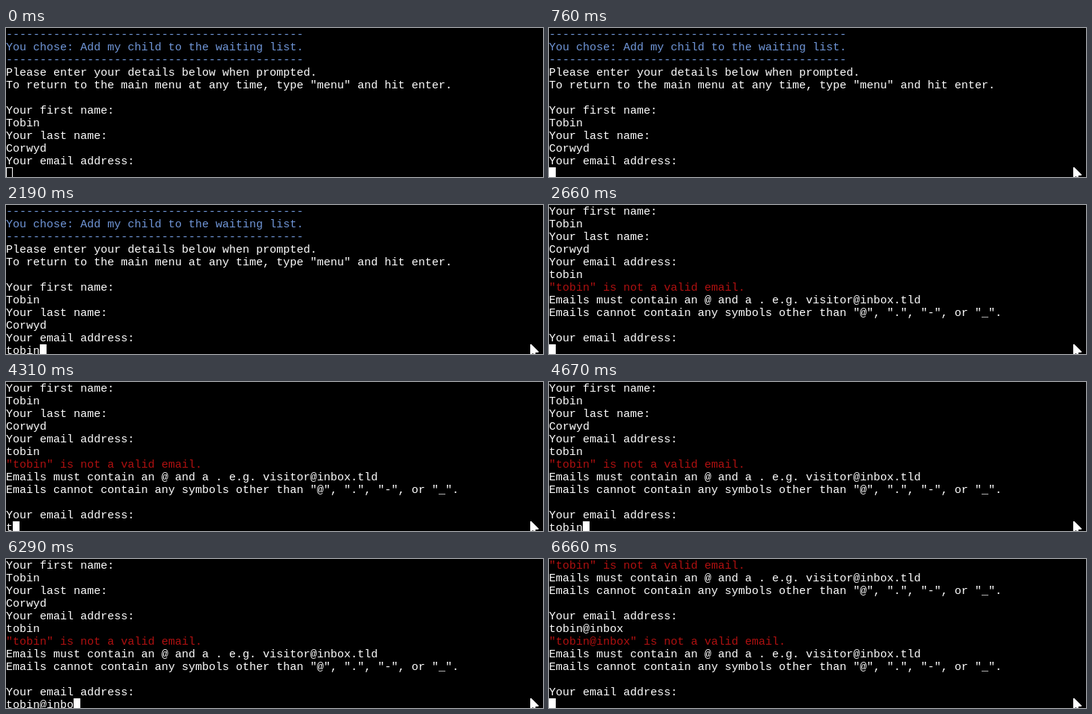
These frames come from a looping animation (715 by 200 pixels, 8000 ms). An HTML page:

```html
<!DOCTYPE html>
<html lang="en">
<head>
<meta charset="utf-8">
<title>Waiting list terminal</title>
<style>
  html, body { margin: 0; width: 100%; height: 100%; overflow: hidden; background: #000; }
  #stage { position: relative; width: 715px; height: 200px; overflow: hidden; background: #000; }
  pre { position: absolute; left: 0; top: 1px; margin: 0; color: #fff;
        font: 15px/17px "Courier New", "Liberation Mono", monospace; }
  .blue { color: #7096d8; }
  .red { color: #b01010; }
  #caret { position: absolute; left: 0; top: 187px; width: 9px; height: 17px;
           box-sizing: border-box; border: 1px solid #fff; }
  #caret.focus { background: #fff; }
  #mouse { position: absolute; left: 698px; top: 0; width: 12px; height: 19px;
           fill: #fff; shape-rendering: crispEdges; }
</style>
</head>
<body>
<div id="stage">
  <pre id="text"></pre>
  <div id="caret"></div>
  <svg id="mouse"><path d="M0 0H1L11 10V11H6.5L9 16H6L4 12 0 15Z"/></svg>
</div>
<script>
const LOOP = 8000, ROWS = 12, CHAR = 9;
const [text, caret, mouse] = ["text", "caret", "mouse"].map(id => document.getElementById(id));

const paint = (colour, s) => `<span class="${colour}">${s}</span>`;
const rule = paint("blue", "-".repeat(44));
const prompt = "Your email address:";

const intro = [
  rule,
  paint("blue", "You chose: Add my child to the waiting list."),
  rule,
  "Please enter your details below when prompted.",
  'To return to the main menu at any time, type "menu" and hit enter.',
  "",
  "Your first name:", "Tobin",
  "Your last name:", "Corwyd",
  prompt
];

// Each entry: the word typed, the time of every key, and the time of Enter
const entries = [
  { word: "tobin", keys: [1720, 1830, 1930, 2120, 2190], enter: 2660 },
  { word: "tobin@inbox",
    keys: [4310, 4470, 4540, 4600, 4670, 5590, 5920, 6000, 6160, 6260, 6360], enter: 6660 }
];

const reply = word => [
  word,
  paint("red", `"${word}" is not a valid email.`),
  "Emails must contain an @ and a . e.g. visitor@inbox.tld",
  'Emails cannot contain any symbols other than "@", ".", "-", or "_".',
  "",
  prompt
];

let shown;
function draw(t) {
  const lines = [...intro];
  let typed = "";
  for (const { word, keys, enter } of entries) {
    if (t >= enter) lines.push(...reply(word));
    else typed += word.slice(0, keys.filter(k => t >= k).length);
  }
  lines.push(typed);
  const html = lines.slice(-ROWS).join("\n");
  if (html !== shown) text.innerHTML = shown = html;

  caret.style.left = typed.length * CHAR + "px";
  caret.classList.toggle("focus", t >= 710);

  // The pointer rises from below the stage in eleven steps
  const step = Math.min(11, Math.floor((t - 170) / 26) + 1);
  mouse.style.top = (t < 170 ? 200 : 198 - step) + "px";
}

const start = performance.now();
(function tick() {
  draw((performance.now() - start) % LOOP);
  requestAnimationFrame(tick);
})();
</script>
</body>
</html>
```
